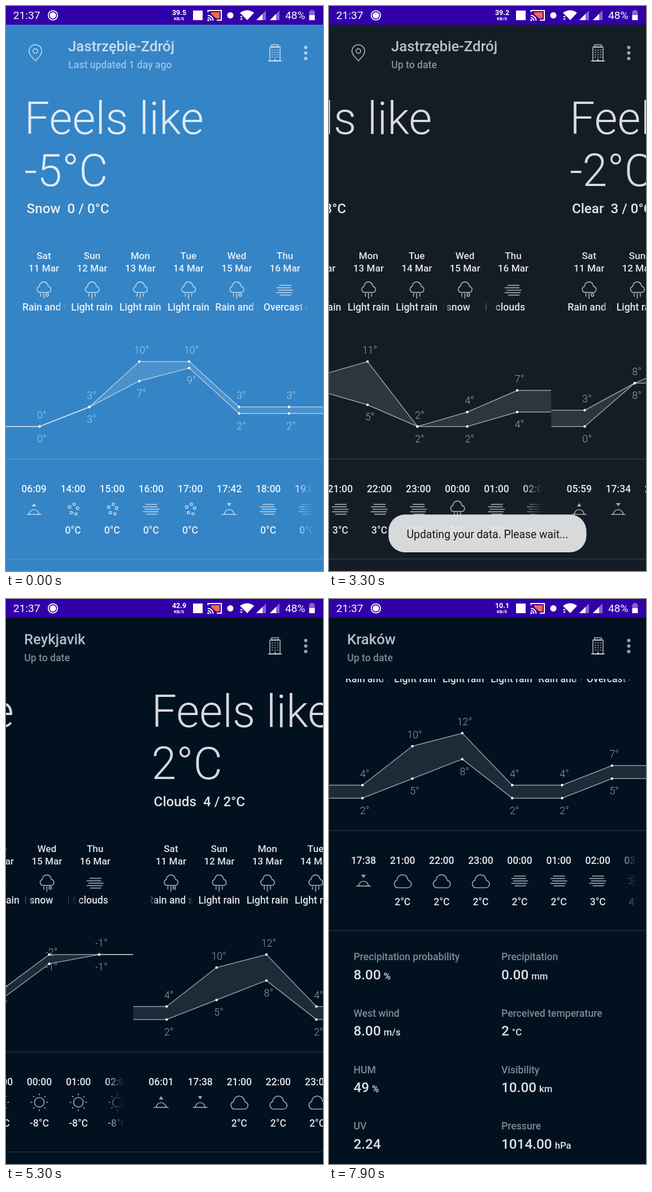
Recreate the animation shown at these times as an HTML page with a canvas. Size 561 by 998 pixels, loop 8 s.

```html
<!DOCTYPE html>
<html lang="en">
<head>
<meta charset="utf-8">
<title>Weather</title>
<style>
html, body { margin: 0; width: 100%; height: 100%; overflow: hidden; background: #3584c6; }
canvas { display: block; width: 561px; height: 998px; }
</style>
</head>
<body>
<canvas id="stage"></canvas>
<script>
const W = 561, H = 998, LOOP = 8000, TAU = Math.PI * 2;
const FONT = 'Roboto, "Open Sans", sans-serif';
const dpr = window.devicePixelRatio || 1;
const stage = document.getElementById('stage');
const layer = document.createElement('canvas');
for (const c of [stage, layer]) { c.width = W * dpr; c.height = H * dpr; }
const main = stage.getContext('2d'), side = layer.getContext('2d');
let g = main;

const clamp = v => Math.max(0, Math.min(1, v));
const ramp = (t, start, len) => clamp((t - start) / len);
const ease = (t, start, len) => { const x = ramp(t, start, len); return x * x * (3 - 2 * x); };
const white = a => `rgba(255,255,255,${a})`;

// ---------- data ----------
const DAYS = ['Sat', 'Sun', 'Mon', 'Tue', 'Wed', 'Thu'];
const FORECAST = ['Rain and snow', 'Light rain', 'Light rain', 'Light rain', 'Rain and snow', 'Overcast clouds'];
const DAY_ICONS = ['sleet', 'rain', 'rain', 'rain', 'sleet', 'lines'];

// hours: "time icon temp"
const hours = s => s.split(', ').map(h => h.split(' '));
const stale = {
  title: 'Jastrzębie-Zdrój', feels: '-5°C', now: 'Snow', range: '0 / 0°C',
  hi: [0, 3, 10, 10, 3, 3], lo: [0, 3, 7, 9, 2, 2], roll: 390,
  hours: hours('06:09 rise, 14:00 snow 0, 15:00 snow 0, 16:00 lines 0, 17:00 snow 0, 17:42 set, 18:00 lines 0, 19:00 lines 0')
};
const pages = [{
  title: 'Jastrzębie-Zdrój', feels: '1°C', now: 'Clouds', range: '4 / 3°C',
  hi: [4, 9, 11, 2, 4, 7], lo: [3, 7, 5, 2, 2, 4], roll: 2230,
  hours: hours('06:07 rise, 17:42 set, 21:00 lines 3, 22:00 lines 3, 23:00 lines 3, 00:00 rain 3, 01:00 lines 3, 02:00 lines 4')
}, {
  title: 'Izabelin (Truskaw)', feels: '-2°C', now: 'Clear', range: '3 / 0°C',
  hi: [3, 8, 12, 4, 4, 6], lo: [0, 8, 8, 2, 2, 5], roll: 3310,
  hours: hours('05:59 rise, 17:34 set, 21:00 wind 0, 22:00 sun 0, 23:00 wind 0, 00:00 wind 0, 01:00 cloud 1, 02:00 cloud 1')
}, {
  title: 'Reykjavik', feels: '-13°C', now: 'Clear', range: '-7 / -8°C',
  hi: [-7, -6, -6, -6, -2, -1], lo: [-8, -6, -7, -5, -1, -1], roll: 4260,
  hours: hours('08:58 rise, 20:17 set, 21:00 sun -8, 22:00 sun -8, 23:00 sun -8, 00:00 sun -8, 01:00 sun -8, 02:00 sun -8')
}, {
  title: 'Kraków', feels: '2°C', now: 'Clouds', range: '4 / 2°C',
  hi: [4, 10, 12, 4, 4, 7], lo: [2, 5, 8, 2, 2, 5], roll: 5235,
  hours: hours('06:01 rise, 17:38 set, 21:00 cloud 2, 22:00 cloud 2, 23:00 cloud 2, 00:00 lines 2, 01:00 lines 2, 02:00 lines 3, 03:00 lines 4')
}];
const DETAILS = [
  ['Precipitation probability', '8.00', '%'], ['Precipitation', '0.00', 'mm'],
  ['West wind', '8.00', 'm/s'], ['Perceived temperature', '2', '°C'],
  ['HUM', '49', '%'], ['Visibility', '10.00', 'km'],
  ['UV', '2.24', ''], ['Pressure', '1014.00', 'hPa']
];

// ---------- helpers ----------
function text(s, x, y, size, weight = 500, alpha = 0.88, align = 'left') {
  g.font = `${weight} ${size}px ${FONT}`;
  g.textAlign = align;
  g.fillStyle = white(alpha);
  g.fillText(s, x, y);
  return g.measureText(s).width;
}
function path(points, close) {
  g.beginPath();
  points.forEach(([x, y], i) => i ? g.lineTo(x, y) : g.moveTo(x, y));
  if (close) g.closePath();
}
function line(...points) { path(points); g.stroke(); }
function fillPoly(...points) { path(points, true); g.fill(); }
function disc(x, y, r) { g.beginPath(); g.arc(x, y, r, 0, TAU); g.fill(); }
function ring(x, y, r) { g.beginPath(); g.arc(x, y, r, 0, TAU); g.stroke(); }

// Draws into a side layer, clips it to a box and fades its left and right ends.
function faded(x, y, w, h, left, right, draw) {
  if (x > W || x + w < 0) return;
  side.setTransform(dpr, 0, 0, dpr, 0, 0);
  side.clearRect(0, 0, W, H);
  side.save();
  side.beginPath();
  side.rect(x, y, w, h);
  side.clip();
  g = side;
  draw();
  side.globalCompositeOperation = 'destination-out';
  const wipe = (from, to) => {
    const shade = side.createLinearGradient(from, 0, to, 0);
    shade.addColorStop(0, '#000');
    shade.addColorStop(1, 'rgba(0,0,0,0)');
    side.fillStyle = shade;
    side.fillRect(Math.min(from, to), y, Math.abs(to - from), h);
  };
  if (left) wipe(x, x + left);
  if (right) wipe(x + w, x + w - right);
  side.restore();
  g = main;
  const top = Math.max(0, Math.floor(y)), bottom = Math.min(H, Math.ceil(y + h));
  if (bottom > top) g.drawImage(layer, 0, top * dpr, W * dpr, (bottom - top) * dpr, 0, top, W, bottom - top);
}

// ---------- weather icons, centred on 0,0 ----------
function cloud(k, dy) {
  g.beginPath();
  g.arc(-8 * k, 4.8 * k + dy, 6.7 * k, Math.PI / 2, 4.4);
  g.arc(-0.3 * k, -1.8 * k + dy, 9.6 * k, 3.2, 6);
  g.arc(9 * k, 5 * k + dy, 6.5 * k, -1.4, Math.PI / 2);
  g.closePath();
  g.stroke();
}
function horizon(up) {
  line([-13, 9], [13, 9]);
  g.beginPath();
  g.arc(0, 9, 8.5, Math.PI, 0);
  g.stroke();
  const tip = up ? -11 : -5, base = up ? -5 : -11;
  fillPoly([0, tip], [4, base], [-4, base]);
}
const icons = {
  rise: () => horizon(true),
  set: () => horizon(false),
  cloud: () => cloud(1, 0.5),
  rain() {
    cloud(0.81, -5.4);
    line([-5.5, 5.5], [-5.5, 11.5]);
    line([0, 5.5], [0, 15]);
    line([5.5, 5.5], [5.5, 11.5]);
  },
  sleet() {
    cloud(0.81, -5.4);
    line([-5.5, 5.5], [-5.5, 11.5]);
    line([0, 5.5], [0, 15]);
    ring(6, 8.5, 2.3);
  },
  lines() {
    [[-10, 11], [-15, 11], [-12, 15], [-15, 13], [-9, 11]]
      .forEach(([a, b], i) => line([a, -8.6 + i * 4.3], [b, -8.6 + i * 4.3]));
  },
  snow() {
    ring(2, -9, 2.2); ring(-6, -4, 2.4); ring(8, -2, 2.4); ring(-3, 6, 2.2); ring(5, 8, 2);
  },
  sun() {
    ring(0, 0, 8.5);
    for (let i = 0; i < 8; i++) {
      const c = Math.cos(i * TAU / 8), s = Math.sin(i * TAU / 8);
      line([12.5 * c, 12.5 * s], [15.5 * c, 15.5 * s]);
    }
  },
  wind() {
    line([-11, 0], [5, 0]);
    line([-15, 5], [7, 5]);
    line([-12, 10], [10, 10]);
    g.beginPath();
    g.arc(7, -3, 8, Math.PI / 2, -2.6, true);
    g.stroke();
    g.beginPath();
    g.arc(5, -3.5, 3.5, Math.PI / 2, -1.8, true);
    g.stroke();
  }
};
function icon(name, x, y) {
  g.save();
  g.translate(x, y);
  g.strokeStyle = g.fillStyle = white(0.62);
  g.lineWidth = 1.7;
  icons[name]();
  g.restore();
}

// ---------- page parts ----------
function marquee(s, x, y, t, start) {
  g.font = `500 17.6px ${FONT}`;
  const lap = g.measureText(s).width + 25.5;
  let shift = Math.max(0, t - start) * 0.0632;
  if (shift >= lap) shift = 0;
  faded(x, y - 18, 76, 26, shift ? 15 : 0, 15, () => {
    text(s, x - shift, y, 17.6);
    if (shift) text(s, x - shift + lap, y, 17.6);
  });
}
function days(p, x, y, t) {
  DAYS.forEach((d, i) => {
    const cx = x + 66.9 + i * 85.35;
    text(d, cx, y + 446.5, 17.2, 500, 0.88, 'center');
    text(`${11 + i} Mar`, cx, y + 469, 17.2, 500, 0.88, 'center');
    icon(DAY_ICONS[i], cx, y + 502);
    if (FORECAST[i] === 'Light rain') text(FORECAST[i], cx, y + 537.5, 17.6, 500, 0.88, 'center');
    else marquee(FORECAST[i], cx - 38, y + 537.5, t, p.roll);
  });
}
function chart(p, x, y) {
  const all = p.hi.concat(p.lo), min = Math.min(...all), max = Math.max(...all);
  const px = i => x + 59.3 + i * 88.3;
  const py = v => y + 742.7 - (v - min) / (max - min) * 114.7;
  const track = vals => [[x, py(vals[0])], ...vals.map((v, i) => [px(i), py(v)]), [x + W, py(vals[5])]];
  const hi = track(p.hi), lo = track(p.lo);
  g.fillStyle = white(0.11);
  fillPoly(...hi, ...lo.slice().reverse());
  g.strokeStyle = white(0.55);
  g.lineWidth = 1.5;
  line(...hi);
  line(...lo);
  for (let i = 0; i < 6; i++) {
    g.fillStyle = '#fff';
    disc(px(i), py(p.hi[i]), 2.2);
    disc(px(i), py(p.lo[i]), 2.2);
    text(p.hi[i] + '°', px(i) + 4, py(p.hi[i]) - 14, 17.8, 300, 0.6, 'center');
    text(p.lo[i] + '°', px(i) + 4, py(p.lo[i]) + 28, 17.8, 300, 0.6, 'center');
  }
}
function hourly(p, x, y, shift) {
  faded(x + 17, y + 832, 528, 115, 0, 36, () => {
    p.hours.forEach(([time, name, temp], i) => {
      const cx = x + 49.5 + i * 69.1 - shift;
      text(time, cx, y + 858.8, 17.5, 500, 0.9, 'center');
      icon(name, cx, y + 889);
      if (temp) text(temp + '°C', cx, y + 932, 17.5, 500, 0.88, 'center');
    });
  });
}
function details(x, y) {
  DETAILS.forEach(([label, value, unit], i) => {
    const dx = x + (i % 2 ? 305 : 43.5), dy = y + 1029 + (i >> 1) * 99.8;
    text(label, dx, dy, 17.6, 500, 0.5);
    const w = text(value, dx, dy + 33.5, 24.3);
    text(unit, dx + w + 5, dy + 33.5, 16.8);
  });
}
function page(p, x, y, t, shift) {
  if (x <= -W || x >= W) return;
  g.save();
  g.beginPath();
  g.rect(x, 141, W, H - 141);
  g.clip();
  text('Feels like', x + 32.6, y + 226, 79.2, 300, 0.84);
  text(p.feels, x + 32.6, y + 318, 79.2, 300, 0.84);
  text(`${p.now}\u00a0\u00a0${p.range}`, x + 36.6, y + 366, 24.2);
  days(p, x, y, t);
  chart(p, x, y);
  g.fillStyle = white(0.15);
  g.fillRect(x, y + 799.5, W, 1.3);
  g.fillRect(x, y + 976, W, 1.3);
  hourly(p, x, y, shift);
  details(x, y);
  g.restore();
}

// ---------- fixed parts ----------
function statusBar(t) {
  g.fillStyle = '#3200a8';
  g.fillRect(0, 0, W, 33);
  text('21:37', 12.8, 23, 19.2, 400, 1);
  g.strokeStyle = g.fillStyle = '#fff';
  g.lineWidth = 1.8;
  ring(83, 16.5, 8.2);
  disc(83, 16.5, 5.6);
  const rate = ['39.5', '1.20', '39.2', '42.9', '10.1'][Math.floor((t + 1100) / 2000)];
  text(rate, 306.5, 16, 12.5, 700, 1, 'center');
  text('KB/S', 306, 25, 8, 700, 1, 'center');
  g.fillRect(331, 8, 17, 17);
  disc(397, 16.5, 5.5);

  // cast
  g.fillStyle = '#ff6a3d';
  fillPoly([363, 11], [378, 11], [378, 22], [372, 22], [363, 14]);
  g.lineWidth = 2;
  line([357.5, 11], [357.5, 8], [381, 8], [381, 25], [373, 25]);
  g.fillStyle = '#fff';
  disc(358, 25, 1.8);
  for (const r of [5.5, 9.5]) {
    g.beginPath();
    g.arc(357, 26, r, -Math.PI / 2, 0);
    g.stroke();
  }

  // wifi
  g.beginPath();
  g.moveTo(427, 25);
  g.lineTo(414, 12);
  g.quadraticCurveTo(427, 3, 439, 12);
  g.closePath();
  g.fill();
  fillPoly([414, 20], [419, 20], [416.5, 17]);
  fillPoly([414, 22], [419, 22], [416.5, 25]);

  // signal and battery
  for (const x of [443, 467]) {
    g.fillStyle = white(0.4);
    fillPoly([x, 25], [x + 17, 25], [x + 17, 8]);
    g.fillStyle = '#fff';
    fillPoly([x, 25], [x + 11, 25], [x + 11, 14]);
  }
  text('48%', 494, 23, 19.2, 400, 1);
  g.fillStyle = white(0.4);
  g.fillRect(539, 7, 5, 2);
  g.fillRect(536.5, 9, 10, 7);
  g.fillStyle = '#fff';
  g.fillRect(536.5, 16, 10, 9);
}
function header(index, note) {
  const x = index ? 32 : 110;
  text(pages[index].title, x, 80, 25.7, 500, 0.72);
  text(note, x + 0.3, 109.7, 17.6, 500, 0.5);
  g.strokeStyle = g.fillStyle = white(0.6);
  g.lineWidth = 1.8;
  if (!index) {
    g.beginPath();
    g.moveTo(52, 97);
    g.bezierCurveTo(45, 89, 40.5, 85, 40.5, 79.5);
    g.arc(52, 79.5, 11.2, Math.PI, 0);
    g.bezierCurveTo(63.5, 85, 59, 89, 52, 97);
    g.closePath();
    g.stroke();
    ring(52, 79.5, 4);
  }
  g.strokeRect(467, 72.5, 18, 24.5);
  g.strokeRect(470, 68.5, 12, 4);
  line([463.5, 97], [488.5, 97]);
  for (let i = 0; i < 12; i++) g.fillRect(470 + (i % 3) * 4.8, 77 + Math.floor(i / 3) * 4.2, 2.6, 1.5);
  g.fillRect(474.8, 93.5, 2.6, 3.5);
  for (const y of [73.3, 83, 92.8]) disc(530.5, y, 3);
}
function spinner(t) {
  const size = 1 - ramp(t, 1750, 200);
  if (t < 450 || !size) return;
  const y = 112 + 118 * ease(t, 450, 450) - 28 * ease(t, 900, 200);
  const dt = t - 1200;
  const sweep = 20 + 270 * (0.5 + 0.5 * Math.cos(dt / 1332 * TAU));
  const start = -142 + 0.3 * dt + (dt > 0 ? 290 - sweep : 0);
  g.save();
  g.beginPath();
  g.rect(0, 141, W, H);
  g.clip();
  g.translate(280.5, y);
  g.scale(size, size);
  g.shadowColor = 'rgba(0,0,0,.3)';
  g.shadowBlur = 5 * dpr;
  g.shadowOffsetY = 2 * dpr;
  g.fillStyle = '#fafafa';
  disc(0, 0, 27);
  g.shadowColor = 'transparent';
  g.strokeStyle = `rgba(16,16,20,${0.3 + 0.7 * ramp(t, 700, 250)})`;
  g.lineWidth = 3.5;
  g.beginPath();
  g.arc(0, 0, 11.8, start * TAU / 360, (start + sweep) * TAU / 360);
  g.stroke();
  g.restore();
}
function toast(t, s, from, to) {
  const a = Math.min(ramp(t, from, 200), 1 - ramp(t, to - 200, 200));
  if (a <= 0) return;
  g.save();
  g.globalAlpha = a;
  g.font = `400 19.3px ${FONT}`;
  const w = g.measureText(s).width + 64.5, x = 280.4 - w / 2;
  g.fillStyle = 'rgba(233,234,234,.92)';
  g.beginPath();
  g.roundRect(x, 898.3, w, 66.7, 29);
  g.fill();
  g.fillStyle = '#14181b';
  g.textAlign = 'center';
  g.fillText(s, 280.4, 939.5);
  g.restore();
}

// ---------- timeline ----------
const BLUE = [53, 132, 198], GREY = [20, 29, 37], NAVY = [1, 17, 32];
const mix = (a, b, k) => a.map((v, i) => v + (b[i] - v) * k);

function draw(t) {
  const fresh = t >= 1800;
  const tint = mix(mix(BLUE, GREY, ramp(t, 1800, 600)), NAVY, ramp(t, 3650, 450));
  const swipe = ease(t, 3082.5, 600) + ease(t, 4106.8, 600) + ease(t, 4960.2, 600);
  const scroll = 391 * ease(t, 6000, 780);
  const shift = 57.5 * ease(t, 7250, 650);
  const index = [3683, 4707, 5560].filter(at => t >= at).length;

  g.setTransform(dpr, 0, 0, dpr, 0, 0);
  g.fillStyle = `rgb(${tint.map(Math.round).join(',')})`;
  g.fillRect(0, 0, W, H);
  pages.forEach((p, i) => {
    const last = i === 3;
    page(i || fresh ? p : stale, (i - swipe) * W, last ? -scroll : 0, t, last ? shift : 0);
  });
  header(index, fresh ? 'Up to date' : 'Last updated 1 day ago');
  spinner(t);
  toast(t, 'Updating your data. Please wait...', 1450, 3550);
  toast(t, 'Everything is up to date ^^', 3600, 5150);
  statusBar(t);
}
function tick() {
  draw(Math.floor(performance.now() % LOOP / 100) * 100);
  requestAnimationFrame(tick);
}
tick();
</script>
</body>
</html>
```
